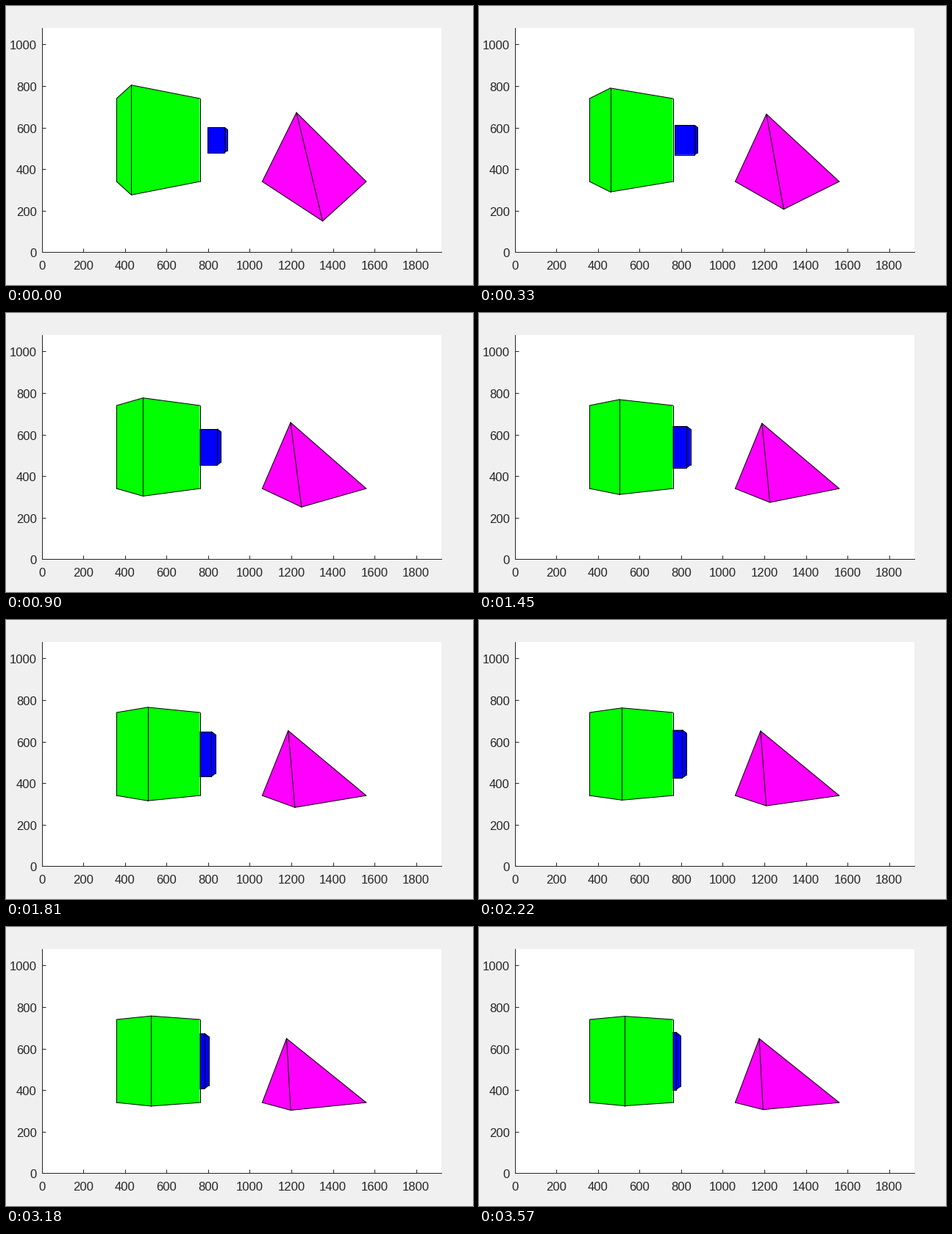
A matplotlib script for the animation above (3610 ms loop, 635 by 380 pixels).

```python
import numpy as np
import matplotlib.pyplot as plt
from matplotlib.animation import FuncAnimation

W, H, DPI = 635, 380, 100
FRAMES, LOOP_MS = 99, 3610
VIEW = np.array([1920, 1080])      # picture plane, fixed at depth 0
PX = 72 / DPI                      # one pixel in points
INK = "#262626"


def project(points, dist):
    """Perspective that keeps depth 0 unchanged (dolly zoom)."""
    scale = dist / (dist - points[:, 2:])
    return VIEW / 2 + (points[:, :2] - VIEW / 2) * scale


def column(left, seam, right, low, high):
    """Two upright walls through three (x, depth) corners."""
    walls = [left, seam, right]
    top = [(x, high, z) for x, z in walls]
    base = [(x, low, z) for x, z in reversed(walls)]
    return top + base


def pyramid(left, right, low, high, depth):
    """Two visible sides; the front corner comes nearest to the camera."""
    seam = left + (right - left) / 5
    return [(left, low, 0), (seam, high, depth / 2),
            (right, low, 0), (seam, low, depth)]


class Solid:
    """Outline through all points plus a seam from the second one."""

    def __init__(self, ax, points, color, z):
        self.points = np.array(points, float)
        n = len(points)
        self.edges = [[i, (i + 1) % n] for i in range(n)] + [[1, n // 2 + 1]]
        self.fill, = ax.fill([0, 0, 0], [0, 0, 0], color=color, lw=0, zorder=z)
        self.lines = [ax.plot([], [], color="black", lw=PX, zorder=z + 0.1,
                              solid_capstyle="round")[0]
                      for _ in self.edges]

    def update(self, dist):
        p = project(self.points, dist)
        self.fill.set_xy(p)
        for line, edge in zip(self.lines, self.edges):
            line.set_data(*p[edge].T)


def label(ax, value, at, offset, align):
    ax.annotate(str(value), at, xytext=offset, textcoords="offset pixels",
                ha=align, va="baseline", color=INK, fontsize=12,
                family="Liberation Sans", annotation_clip=False)


def make_axes(fig):
    left, bottom, scale = 48.5, 44.7, 0.2829
    width, height = VIEW * scale
    ax = fig.add_axes([left / W, bottom / H, width / W, height / H])
    xticks, yticks = (range(0, size, 200) for size in VIEW)
    ax.set(xlim=(0, VIEW[0]), ylim=(0, VIEW[1]), xticks=xticks, yticks=yticks)
    ax.tick_params(direction="in", length=5 * PX, width=PX, color=INK,
                   labelbottom=False, labelleft=False)
    ax.spines[["top", "right"]].set_visible(False)
    for side in ("left", "bottom"):
        ax.spines[side].set(color=INK, linewidth=PX)
    for v in xticks:
        label(ax, v, (v, 0), (0, -24), "center")
    for v in yticks:
        label(ax, v, (0, v), (-7, -7), "right")
    return ax


fig = plt.figure(figsize=(W / DPI, H / DPI), dpi=DPI, facecolor="#f0f0f0")
ax = make_axes(fig)
near, far = -3200, -4000
solids = [
    Solid(ax, column((160, near), (560, near), (560, far), 240, 840), "#0000ff", 2),
    Solid(ax, column((360, 0), (560, 200), (760, 0), 340, 740), "#00ff00", 3),
    Solid(ax, pyramid(1060, 1560, 340, 640, 400), "#ff00ff", 3),
]


def draw(i):
    for solid in solids:
        solid.update(820 + 20 * i)  # the camera backs away steadily
    return []


anim = FuncAnimation(fig, draw, frames=FRAMES, interval=LOOP_MS / FRAMES,
                     repeat=True, repeat_delay=0, blit=False)
plt.show()
```
